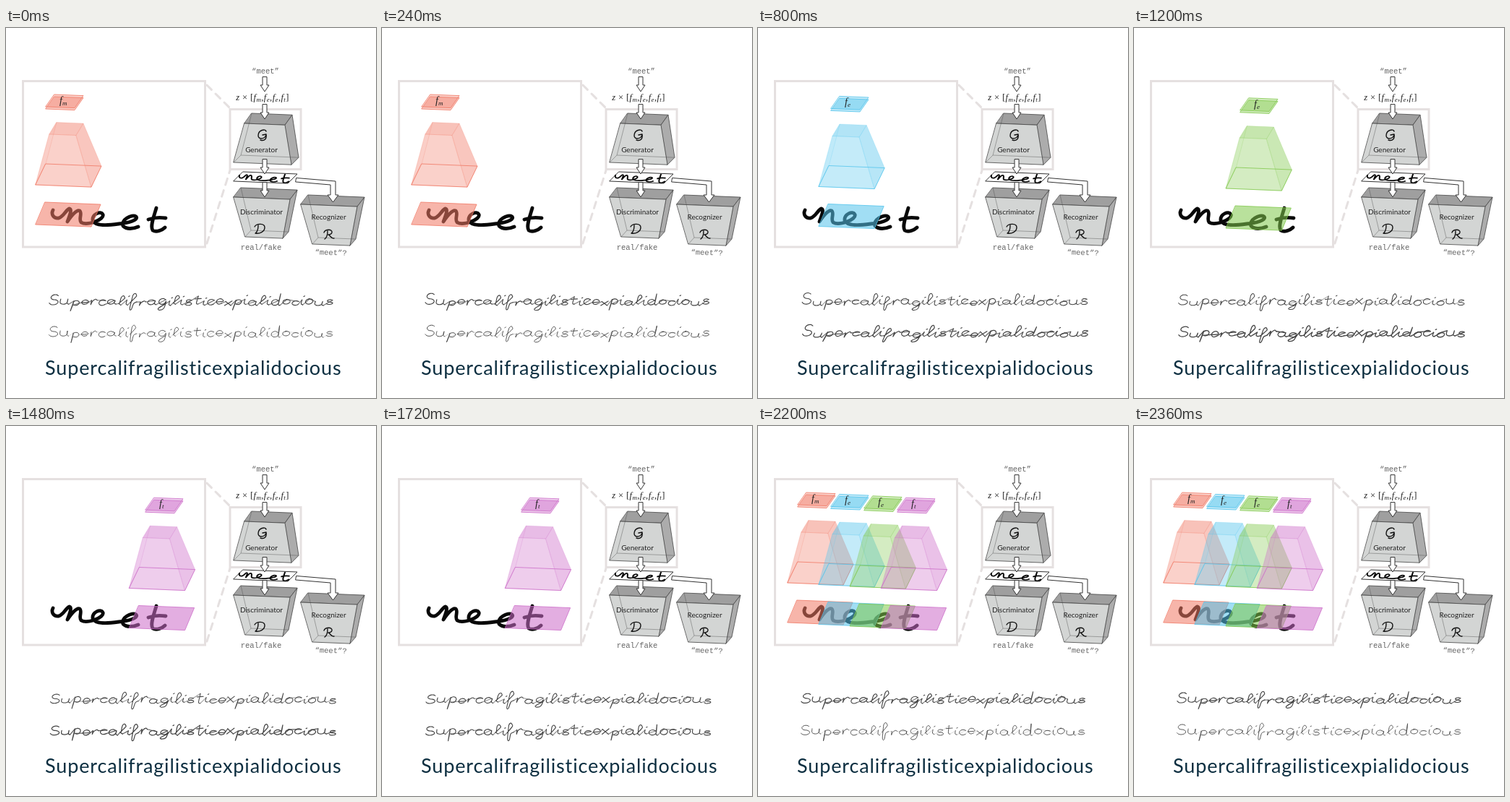
Animation of 512 by 512 pixels, one loop 2440 ms. Source, as an HTML page:

```html
<!DOCTYPE html>
<html lang="en">
<head>
<meta charset="utf-8">
<title>Handwriting generator</title>
<style>
html, body { margin: 0; width: 100%; height: 100%; overflow: hidden; background: #fff; }
svg { display: block; width: 100vw; height: 100vh; }
path, polygon { stroke-linejoin: round; stroke-linecap: round; }
.lbl { font: 10px Lato, sans-serif; text-anchor: middle; fill: #222; }
.mono { font: 10.5px "Liberation Mono", monospace; text-anchor: middle; fill: #666; }
.math { font: italic 12.5px "Liberation Serif", serif; fill: #222; }
.script { fill: none; stroke: #111; stroke-width: 1.4; }
.solid { stroke: #444; stroke-width: .8; }
.frame { fill: none; stroke: #e5e0e0; stroke-width: 3; }
.arrow { fill: #fff; stroke: #333; stroke-width: 1; }
.pen { fill: none; stroke: #444; }
</style>
</head>
<body>
<svg viewBox="0 0 512 512">
  <defs>
    <path id="meet" fill="none" stroke="#080808" stroke-width="4.8" d="M65 252C62 258 66 264 73 263C80 261 84 250 88 250C92 251 87 262 85 268C91 259 98 251 102 253C106 256 100 265 104 269C112 274 137 265 134 258C131 252 119 258 120 266C123 275 142 273 156 271C168 270 184 266 180 261C174 257 158 266 162 274C167 279 176 278 183 275M208 249C205 260 199 274 203 280C208 283 216 280 220 276M197 265C205 262 214 262 221 263"/>
    <path id="down" class="arrow" d="M-3 0V11H-6L0 20L6 11H3V0Z"/>
  </defs>
  <path class="frame" stroke-dasharray="9 8" d="M278 79L310 111M278 298L310 197"/>
  <rect class="frame" x="23.5" y="73.5" width="252" height="229.5"/>
  <use href="#meet"/>
  <g id="layers"></g>

  <g id="solids" class="solid"></g>
  <rect class="frame" x="310" y="112.5" width="98" height="83"/>
  <text class="mono" x="359" y="63">“meet”</text>
  <use href="#down" x="358" y="68"/>
  <text class="math" id="input" x="355" y="100" text-anchor="middle" letter-spacing=".4"></text>
  <use href="#down" x="358" y="106"/>
  <path class="script" transform="translate(355 148)" d="M5-5C4-9-6-7-6 1C-6 7 4 6 5-1L0 0M5-1C6 5 3 9-3 7"/>
  <text class="lbl" x="353.5" y="172">Generator</text>
  <polygon class="arrow" id="paper"/>
  <use href="#meet" transform="matrix(.44 0 0 .36 294.5 113)"/>
  <use href="#down" x="358" y="182"/>
  <path class="arrow" d="M402 207.5L456 212V231H460L452.5 241L445 231H449V217L401 213Z"/>
  <use href="#down" x="358" y="214"/>
  <text class="lbl" x="353.5" y="257.5">Discriminator</text>
  <path class="script" transform="translate(351 278)" d="M-2-5C-2 0-3 4-6 6C0 7 7 4 7-2C7-8-4-8-7-3"/>
  <text class="lbl" x="446.5" y="264.5">Recognizer</text>
  <path class="script" transform="translate(447 286)" d="M-2-5C-2 0-3 4-6 6M-7-3C-5-8 5-8 4-3C3 0 0 0-1 0C2 1 3 6 7 5"/>
  <text class="mono" x="353" y="307">real/fake</text>
  <text class="mono" transform="translate(449.5 314) rotate(2)">“meet”?</text>

  <g id="rows"></g>
  <text x="54" y="479.5" font-family="Lato, sans-serif" font-size="27" letter-spacing=".87" fill="#0d2f41">Supercalifragilisticexpialidocious</text>
</svg>
<script>
const $ = id => document.getElementById(id);
const LOOP = 2440;
const TAU = 2 * Math.PI;

// Parallelogram from its front left corner, leaning right by d over height h
const quad = (x, y, w, d, h) => {
  const drop = w * .04;
  return [[x, y], [x + w, y + drop], [x + w + d, y + drop - h], [x + d, y - h]];
};
const polygon = (pts, attrs) => `<polygon points="${pts.join(" ")}" ${attrs}/>`;
// Visible faces of the solid between two parallelograms
const faces = (top, base) => [top, [top[1], top[2], base[2], base[1]], [top[0], top[1], base[1], base[0]]];

function solid(top, base) {
  const fills = ["#9f9f9f", "#acacac", "#d3d5d4"];
  const hidden = [[base[0], base[3], base[2]], [base[3], top[3]]];
  return faces(top, base).map((f, i) => polygon(f, `fill="${fills[i]}"`)).join("") +
    hidden.map(l => `<polyline points="${l.join(" ")}" fill="none" stroke-width=".4"/>`).join("");
}
const bin = (x, y) => solid(quad(x, y, 78, 10, 13), quad(x + 16, y + 55, 52, 8, 9));
$("solids").innerHTML = solid(quad(330, 132, 56, 10, 14), quad(315, 186, 80, 10, 10)) +
  bin(315, 234) + bin(408, 244);
$("paper").setAttribute("points", quad(315, 212, 75, 13, 13).join(" "));

const subs = ["m", "e", "e", "t"];
const feature = s => `f<tspan dy="2" style="font-size:9px">${s}</tspan>`;
$("input").innerHTML = `z <tspan font-style="normal">× [</tspan>` +
  subs.map(feature).join(`<tspan dy="-2">,</tspan>`) +
  `<tspan dy="-2" font-style="normal">]</tspan>`;

// Coloured slab, trapezoid and sheet for each letter
const colors = ["#f07864", "#54c4ec", "#80c84c", "#cc6cc8"];
$("layers").innerHTML = colors.map((fill, i) => {
  const shape = (pts, alpha, line) => polygon(pts, `fill="${fill}" fill-opacity="${alpha}" stroke="${fill}" stroke-width="${line}"`);
  const top = quad(60, 147, 37, 10, 16.5), base = quad(41, 217, 77, 14, 29);
  const [lid, side, front] = faces(top, base);
  const back = [top[0], top[3], base[3], base[0]];
  return `<g><g transform="translate(${46 * i} ${2.4 * i})">
    ${shape(quad(55, 112, 40, 12, 17), .4, .8)}${shape(quad(55, 109, 40, 12, 17), .35, .8)}
    <text class="math" x="74" y="105" style="font-size:14px">${feature(subs[i])}</text></g>
    <g transform="translate(${43.2 * i} ${2.5 * i})">
    ${shape(lid, .45, .2)}${shape(side, .42, .2)}${shape(front, .34, .2)}${shape(back, .03, .2)}
    ${shape(base, 0, .8)}${shape(quad(41, 272, 77, 13, 31), .55, .8)}</g></g>`;
}).join("");

// Pen letters from arcs (angles in turns) and stems; baseline 0, x-height 10
const arc = (x, y, rx, ry, from, to) => Array.from({ length: 7 }, (_, i) => {
  const a = TAU * (from + (to - from) * i / 6);
  return [x + rx * Math.cos(a), y + ry * Math.sin(a)];
});
const stem = (x, h) => [[x, h], [x, 2], [x + 2, 0]];
const bowl = arc(4, 5, 4, 5, .1, 1);
const loop = [[0, 3], ...arc(3, 14, 2, 6, 0, .5)];
const curl = [...arc(4, 7.5, 3, 2.5, .1, .7), ...arc(4, 2.5, 3.5, 2.5, .2, -.45)];
const LETTERS = {
  S: [curl.map(([x, y]) => [x * 1.4, y * 2])],
  a: [[...bowl, ...stem(8, 8)]],
  c: [arc(4, 5, 4, 5, .12, .88)],
  d: [[...bowl, ...stem(8, 20)]],
  e: [[[0, 4], ...arc(4, 5, 3.5, 5, 0, .88)]],
  f: [[...loop, [1, -8], [3, -10], [4, 1], [7, 4]]],
  g: [[...bowl, [7, -7], [3, -10], [1, -7], [8, 1]]],
  i: [stem(1, 9), [[2, 15], [3, 16]]],
  l: [[...loop, ...stem(1, 5)]],
  o: [arc(4, 5, 4, 5, .25, 1.3)],
  p: [[[2, 9], [1, -11], [2, 3], ...arc(5, 5, 3.5, 5, .4, -.35)]],
  r: [[[1, 8], [1, 0], [2, 6], [5, 10], [7, 8]]],
  s: [curl],
  t: [stem(3, 17), [[0, 11], [7, 12]]],
  u: [[[0, 9], ...arc(4, 4, 4, 4, .5, 1), ...stem(8, 9)]],
  x: [[[0, 9], [7, 0]], [[7, 10], [0, 0]]]
};
const word = [..."Supercalifragilisticexpialidocious"].map(l => LETTERS[l]);
const width = strokes => Math.max(...strokes.flat().map(p => p[0])) + 2.5;
const total = word.reduce((sum, l) => sum + width(l), -2.5);

const num = v => v.toFixed(2);
function spline(p) {
  let d = `M${p[0].map(num)}`;
  for (let i = 0; i < p.length - 1; i++) {
    const a = p[i - 1] || p[i], b = p[i], c = p[i + 1], e = p[i + 2] || c;
    const h1 = b.map((v, k) => num(v + (c[k] - a[k]) / 6));
    const h2 = c.map((v, k) => num(v - (e[k] - b[k]) / 6));
    d += `C${h1} ${h2} ${c.map(num)}`;
  }
  return d;
}

// Each row's style drifts round a circle; swing sets how far
const rows = [{ y: 383, swing: -.3 }, { y: 427, swing: 1 }];
$("rows").innerHTML = `<g class="pen"><path/><path/></g>`.repeat(rows.length);

function write({ y, swing }, t, group) {
  const turn = TAU * Math.min(1, t / 2360);
  const sin = Math.sin(turn), cos = Math.cos(turn);
  const slant = .16 + swing * (.1 * sin - .06 * cos);
  const left = 59 - cos, right = 454 - 2.5 * cos;
  const scale = (right - left) / total;
  let x = left, ink = "", joins = "", last;
  word.forEach((letter, n) => {
    const lift = Math.sin(n * 2.3 + turn);
    const tall = .7 + .1 * Math.sin(n * 1.7 + turn);
    const place = ([px, py]) => [x + px * scale + py * slant, y - lift - py * tall];
    const strokes = letter.map(s => s.map(place));
    ink += strokes.map(spline).join("");
    if (n > 1) joins += spline([last, strokes[0][0]]);
    last = strokes[0].at(-1);
    x += width(letter) * scale;
  });
  const [pen, link] = group.children;
  pen.setAttribute("d", ink);
  link.setAttribute("d", joins);
  link.setAttribute("stroke-opacity", .6 - .4 * swing * cos);
  group.setAttribute("stroke-width", 1.1 - .2 * swing * cos);
}

function draw(t) {
  const phase = Math.max(0, Math.floor((t - 40) / 480));
  [...$("layers").children].forEach((g, i) => {
    g.style.display = phase > 3 || phase === i ? "" : "none";
  });
  // The writing moves in 80 ms steps, re-timed once at 1480 ms
  const from = t < 1480 ? 0 : 1480;
  const held = from + Math.floor((t - from) / 80) * 80;
  rows.forEach((row, i) => write(row, held, $("rows").children[i]));
}

const start = performance.now();
function tick() {
  draw((performance.now() - start) % LOOP);
  requestAnimationFrame(tick);
}
tick();
</script>
</body>
</html>
```
